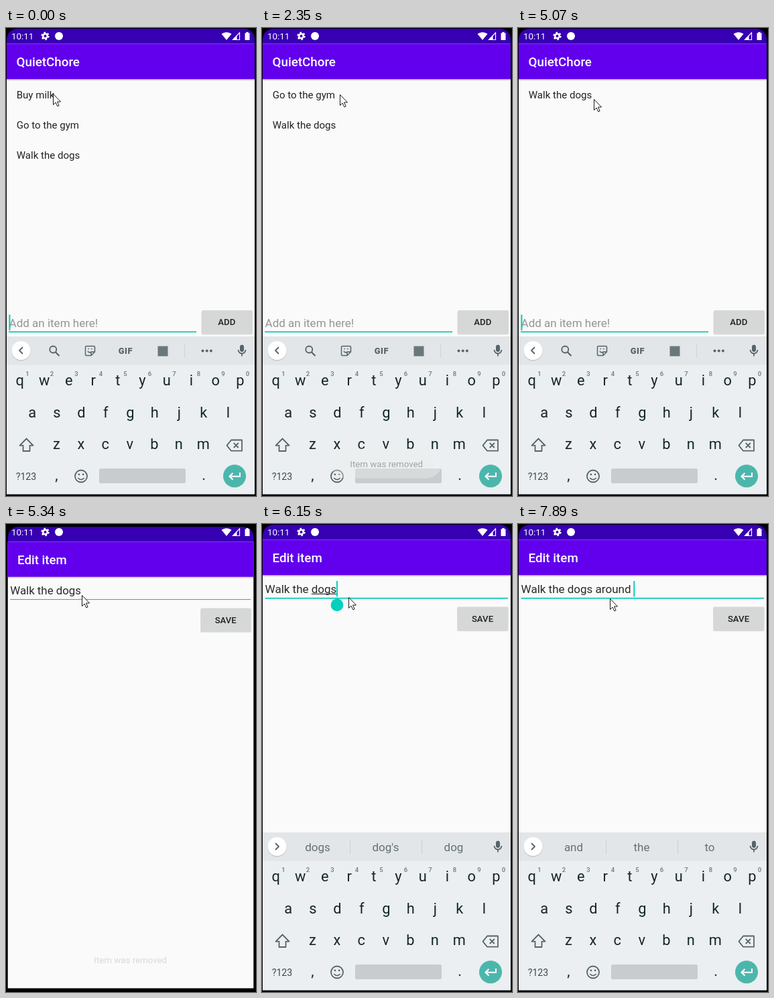
Write an HTML page that moves like this. It is 373 px wide and 698 px high and loops after 8 s.

```html
<!DOCTYPE html>
<html lang="en">
<head>
<meta charset="utf-8">
<title>To-do list</title>
<style>
html, body { margin: 0; width: 100%; height: 100%; overflow: hidden; background: #000; }
svg { display: block; width: 100vw; height: 100vh; }
text { font-family: Roboto, sans-serif; white-space: pre; }
.mid { text-anchor: middle; }
.title { font-size: 18.8px; font-weight: 500; fill: #fff; }
.item { font-size: 15.05px; fill: #222; }
.field { font-size: 17px; }
.btn { font-size: 13.2px; font-weight: 500; fill: #212121; text-anchor: middle; }
.key { font-size: 21.8px; fill: #15262c; text-anchor: middle; }
.hint { font-size: 9.5px; font-weight: 500; fill: #6b777d; text-anchor: middle; }
.word { font-size: 17px; fill: #647076; text-anchor: middle; }
.icon { fill: none; stroke: #56646b; stroke-width: 1.8; stroke-linejoin: round; }
</style>
</head>
<body>
<svg viewBox="0 0 373 698">
  <defs>
    <clipPath id="screen"><rect x="1" y="1" width="370" height="720" rx="16"/></clipPath>
    <linearGradient id="shade" x2="0" y2="1">
      <stop stop-color="#000" stop-opacity=".22"/><stop offset="1" stop-color="#000" stop-opacity="0"/>
    </linearGradient>
    <g id="page">
      <rect width="373" height="24" fill="#3700b3"/>
      <rect y="23.6" width="373" height="672" fill="#fafafa"/>
      <rect y="23.6" width="373" height="52.7" fill="#6200ee"/>
      <rect y="76.3" width="373" height="3" fill="url(#shade)"/>
    </g>
    <g id="button">
      <rect x="-.5" y=".5" width="76.5" height="36" rx="2" fill="#000" opacity=".12"/>
      <rect width="75.5" height="35.3" rx="2" fill="#d6d7d7"/>
    </g>
  </defs>
  <rect width="373" height="698"/>
  <g clip-path="url(#screen)">
    <g id="main">
      <use href="#page"/>
      <text class="title" x="15.5" y="57">QuietChore</text>
      <g id="list"></g>
      <text class="field" x="4.6" y="446" fill="#959595">Add an item here!</text>
      <rect x="4" y="452.3" width="280" height="1.9" fill="#18cdb8"/>
      <rect id="caret" x="4.4" y="427.5" width="2" height="23.5" fill="#03c9b6"/>
      <use href="#button" x="292" y="421"/>
      <text class="btn" x="329.3" y="443.3">ADD</text>
    </g>
    <g id="edit" clip-path="url(#screen)">
      <use href="#page"/>
      <text class="title" x="15.5" y="57">Edit item</text>
      <text id="typed" class="field" x="4.6" y="103.2" fill="#2a2a2a"></text>
      <rect id="line" x="4.5" y="109.8" width="362.5"/>
      <rect id="spell" y="103.8" height="1.2" fill="#333"/>
      <g id="entry" fill="#03d0bd">
        <rect x="-1" y="85" width="2" height="23.5"/>
        <path id="handle" d="M0 110.5 L6 113.5 A9.4 9.4 0 1 1 -6 113.5Z"/>
      </g>
      <use href="#button" x="291.5" y="123.5"/>
      <text class="btn" x="329" y="146">SAVE</text>
    </g>
    <g id="board">
      <rect y="460" width="373" height="238" fill="#ebeff1"/>
      <rect y="460" width="373" height="42.5" fill="#e2e6e8"/>
      <circle cx="22.5" cy="482" r="14.4" fill="#000" opacity=".12"/>
      <circle cx="22.5" cy="481" r="14" fill="#fff"/>
      <path id="chevron" class="icon"/>
      <g id="tools">
        <g class="icon">
          <circle cx="70.3" cy="479.5" r="5"/>
          <path d="M74 483.5 l5.5 5.5" stroke-width="2.2"/>
          <path d="M120 474.5 h11 q1.5 0 1.5 1.5 v7 l-5.5 5.5 h-7 q-1.5 0 -1.5 -1.5 v-11 q0 -1.5 1.5 -1.5 M132.5 483 h-5.5 v5.5 M122 482 q2 3 5 1.5 M122.5 478.5 h1.5 M127 478.5 h1.5" stroke-width="1.5"/>
        </g>
        <text class="mid" x="178.5" y="485.8" font-size="12.8" font-weight="900" fill="#56646b" letter-spacing=".6">GIF</text>
        <rect x="226.5" y="474.5" width="15" height="15" fill="#6b777d"/>
        <rect x="266" y="471" width="1" height="21" fill="#cfd4d7"/>
        <g fill="#56646b"><circle cx="293.5" cy="481.5" r="2"/><circle cx="299.7" cy="481.5" r="2"/><circle cx="305.9" cy="481.5" r="2"/></g>
      </g>
      <g id="words">
        <path d="M131.5 470.5 v22 M238.5 470.5 v22" stroke="#cbd0d3"/>
      </g>
      <rect x="349" y="472.5" width="6" height="10.5" rx="3" fill="#56646b"/>
      <path class="icon" d="M346.5 480 a5.5 5.5 0 0 0 11 0 M352 485.5 v4"/>
      <g id="keys"></g>
      <g class="icon">
        <path d="M30.5 612.5 L20.5 622.7 H25.5 V631 H35.5 V622.7 H40.5Z"/>
        <path d="M336 614.5 H352 V630.7 H336 L329.5 622.6Z M339.8 619 l7 7 M346.8 619 l-7 7"/>
        <circle cx="112" cy="668.5" r="9"/>
        <path d="M107.3 671 q4.7 5 9.4 0" stroke-width="1.6"/>
      </g>
      <circle cx="108.9" cy="665.8" r="1.4" fill="#56646b"/>
      <circle cx="115.1" cy="665.8" r="1.4" fill="#56646b"/>
      <rect x="139" y="657" width="129" height="22" rx="2.5" fill="#c8ccce"/>
      <text class="mid" x="30" y="673.5" font-size="14.2" fill="#3a4a50">?123</text>
      <text class="key" x="75.5" y="674">,</text>
      <text class="key" x="295" y="674">.</text>
      <circle cx="341" cy="668.3" r="17" fill="#4db6ac"/>
      <path d="M349 663 v5.8 H333.5 m5 -5 l-5 5 5 5" fill="none" stroke="#fff" stroke-width="2"/>
    </g>
    <g id="toast">
      <rect id="pill" x="103" y="627" width="165" height="44.5" rx="22" fill="#eef0f0"/>
      <text class="mid" x="185.7" y="655" font-size="13.3" fill="#2c2c2c">Item was removed</text>
    </g>
    <g fill="#fff">
      <text x="8" y="17" font-size="13.4">10:11</text>
      <g fill="none" stroke="#fff">
        <circle cx="58.5" cy="12" r="3.3" stroke-width="2.6"/>
        <circle cx="58.5" cy="12" r="5.2" stroke-width="2" stroke-dasharray="2.7 2.745"/>
      </g>
      <circle cx="79" cy="12" r="6"/>
      <path d="M321.5 8.8 Q329 3.5 336.5 8.8 L329 18Z"/>
      <path d="M348.5 7 V17.5 H338.5Z" fill="none" stroke="#fff" stroke-width="1.2"/>
      <path d="M344.5 11.5 V17.5 H338.5Z"/>
      <path d="M356.5 7.5 h2 v-1.5 h3 v1.5 h2 v10.5 h-7z"/>
    </g>
  </g>
  <rect y="695.5" width="373" height="3"/>
  <path id="mouse" d="M0 0 V16 L3.5 12.5 L6.3 18.3 L8.6 17.3 L6 11.5 H11Z" fill="#fff" stroke="#000" stroke-width=".9"/>
</svg>
<script>
const LOOP = 8000;
const $ = id => document.getElementById(id);
const clamp = v => Math.max(0, Math.min(1, v));
const span = (t, a, b) => clamp((t - a) / (b - a));
const mix = (a, b, p) => a + (b - a) * p;
const smooth = p => p * p * (3 - 2 * p);
const show = (id, on) => $(id).setAttribute('display', on ? 'inline' : 'none');
const set = (id, attrs) => { for (const k in attrs) $(id).setAttribute(k, attrs[k]); };

function label(parent, cls, x, y, str = '') {
  const el = document.createElementNS('http://www.w3.org/2000/svg', 'text');
  el.setAttribute('class', cls);
  el.setAttribute('x', x);
  el.setAttribute('y', y);
  el.textContent = str;
  return $(parent).appendChild(el);
}

const pen = document.createElement('canvas').getContext('2d');
const width = str => {
  pen.font = '17px Roboto, sans-serif';
  return pen.measureText(str).width;
};

[['qwertyuiop', 20.8, 533], ['asdfghjkl', 39.3, 580.5], ['zxcvbnm', 75.3, 628]].forEach(([row, x, y], r) =>
  [...row].forEach((c, i) => {
    label('keys', 'key', x + i * 36.5, y, c);
    if (!r) label('keys', 'hint', x + 11.2 + i * 36.5, 518.5, (i + 1) % 10);
  }));

const items = ['Buy milk', 'Go to the gym', 'Walk the dogs'];
const rows = items.map((_, i) => label('list', 'item', 15.7, 104.7 + i * 45.2));
const words = [83, 184.5, 286].map(x => label('words', 'word', x, 488));

// time, added text, suggestions
const typing = [
  [0, '', "dogs dog's dog"],
  [6550, ' ', 'and are to'],
  [7100, ' a', 'a and are'],
  [7240, ' ar', 'are around art'],
  [7370, ' aro', 'arose around aroma'],
  [7510, ' aroun', 'aroun around arouse'],
  [7660, ' around', 'arond around rounds'],
  [7890, ' around ', 'and the to']
];

// start, end, x, y of each pointer move
const moves = [
  [1250, 2200, 116.5, 99.5],
  [3500, 3880, 113.5, 106.5],
  [5680, 5900, 129.5, 109.5],
  [6540, 6680, 137.5, 111.5]
];

function pointer(t) {
  let x = 70.5, y = 98.5;
  for (const [a, b, nx, ny] of moves) {
    const p = smooth(span(t, a, b));
    x = mix(x, nx, p);
    y = mix(y, ny, p);
  }
  return `translate(${x} ${y})`;
}

function toastAlpha(t) {
  const first = span(t, 450, 680) * (1 - span(t, 2210, 2440));
  const second = span(t, 2900, 3130) * (1 - span(t, 4620, 4880));
  const ghost = t >= 5290 ? 0.16 * (1 - span(t, 5400, 5620)) : 0;
  return first + second + ghost;
}

function draw(t) {
  const removed = t < 450 ? 0 : t < 2900 ? 1 : 2;
  rows.forEach((el, i) => el.textContent = items[i + removed] || '');
  show('caret', (t + 160) % 1000 < 500);

  // page change
  const open = span(t, 5140, 5540);
  const size = mix(0.85, 1, 1 - (1 - open) ** 4);
  const alpha = span(t, 5140, 5260);
  show('main', alpha < 1);
  show('edit', alpha > 0);
  set('edit', { opacity: alpha, transform: `translate(186 349) scale(${size}) translate(-186 -349)` });

  // edit field
  const focus = t >= 5790;
  const [, added, guess] = typing.filter(s => t >= s[0]).pop();
  const str = 'Walk the dogs' + added;
  $('typed').textContent = str;
  set('line', focus ? { height: 1.9, fill: '#18cdb8' } : { height: 1.1, fill: '#8c8c8c' });
  set('spell', { x: 4.6 + width('Walk the '), width: width('dogs') });
  show('spell', focus && !added);
  show('entry', focus);
  show('handle', !added);
  set('entry', { transform: `translate(${5.2 + width(str)} 0)` });

  // keyboard
  const hide = span(t, 5110, 5320), rise = span(t, 5800, 6100);
  const editing = t >= 5600;
  const drop = editing ? (1 - rise) ** 3 : hide * hide;
  set('board', { transform: `translate(0 ${drop * 238})` });
  show('board', drop < 1);
  show('tools', !editing);
  show('words', editing);
  set('chevron', { d: editing ? 'M20 476 l5 5 -5 5' : 'M25 476 l-5 5 5 5' });
  guess.split(' ').forEach((w, i) => words[i].textContent = w);

  set('toast', { opacity: toastAlpha(t) });
  show('pill', t < 5100);
  set('mouse', { transform: pointer(t) });
}

function tick() {
  draw(performance.now() % LOOP);
  requestAnimationFrame(tick);
}
tick();
</script>
</body>
</html>
```
